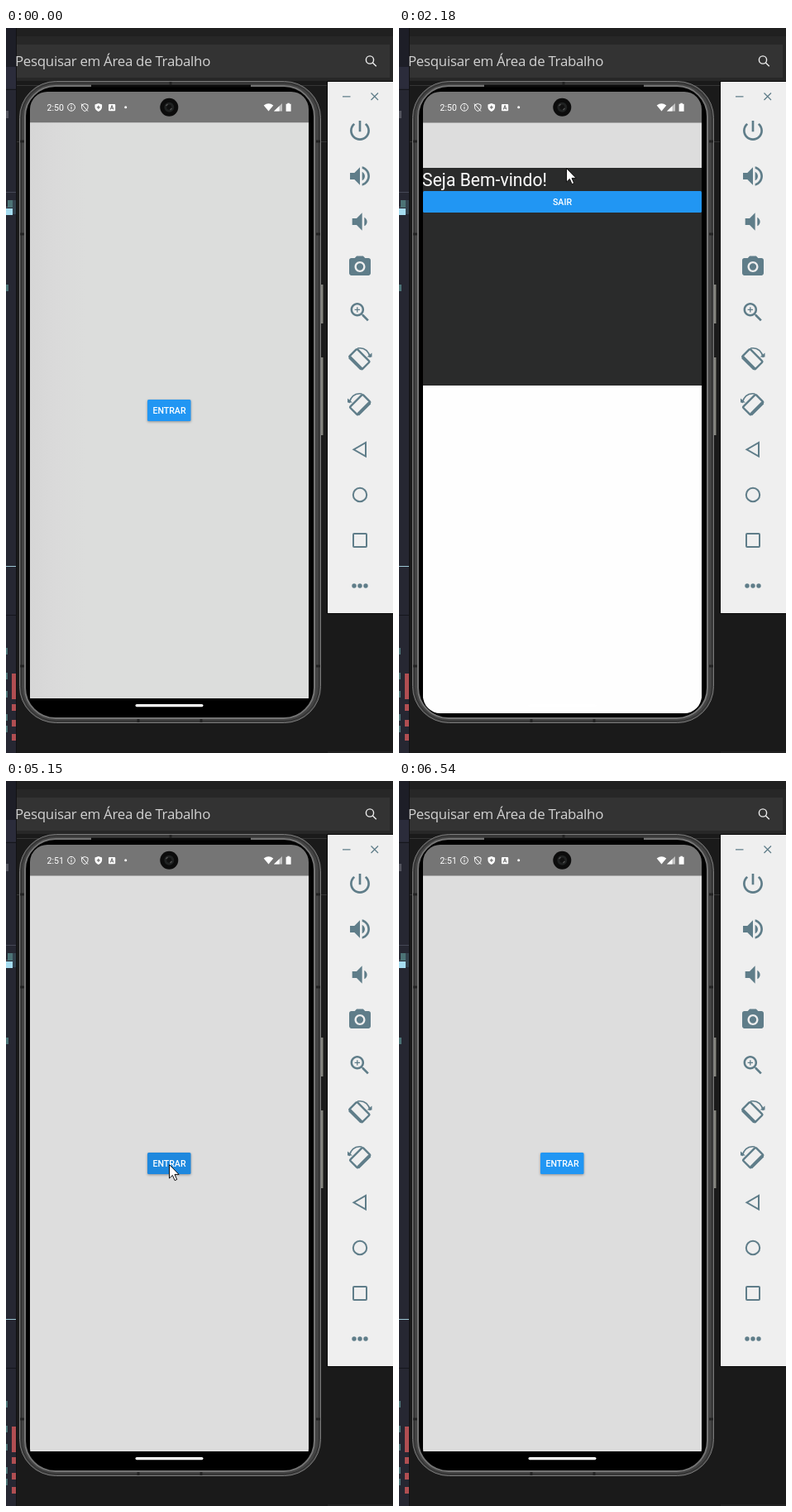
Write an HTML page that moves like this. It is 468 by 876 pixels and loops after 7.07 s.

```html
<!DOCTYPE html>
<html lang="pt">
<head>
<meta charset="utf-8">
<title>Modal</title>
<style>
html, body { margin: 0; width: 100%; height: 100%; overflow: hidden; background: #1a1a1a; }
svg { display: block; width: 468px; height: 876px; }
text { font-family: Roboto, sans-serif; fill: #fff; }
.search { font: 16.9px "Open Sans", sans-serif; letter-spacing: -.3px; fill: #d2d2d2; }
.label { font-size: 10.6px; font-weight: 500; text-anchor: middle; }
.line { fill: none; stroke: #5f7d89; stroke-width: 2; }
.button { filter: drop-shadow(0 1.5px 1.5px rgba(0, 0, 0, .35)); }
</style>
</head>
<body>
<svg viewBox="0 0 468 876">
  <defs>
    <clipPath id="screen"><rect x="29" y="77" width="337" height="751" rx="21"/></clipPath>
    <linearGradient id="tint">
      <stop offset="0" stop-color="#d6d6d6"/><stop offset=".09" stop-color="#dadada"/>
      <stop offset=".2" stop-color="#dcdddc"/>
    </linearGradient>
  </defs>

  <!-- desktop -->
  <rect width="468" height="876" fill="#1a1a1a"/>
  <rect x="12" width="456" height="10" fill="#202020"/>
  <rect x="12" y="10" width="456" height="54" fill="#272727"/>
  <rect x="12" y="20" width="452" height="40" fill="#333"/>
  <path d="M12 69.500H389M12 137.500H389" stroke="#343434"/>
  <path d="M389 875H468" stroke="#222" stroke-width="2"/>

  <!-- editor strip -->
  <rect width="12" height="876" fill="#262732"/>
  <rect width="12" height="47" fill="#1d1e27"/>
  <rect y="47" width="12" height="26" fill="#2b2c3b"/>
  <path d="M0 74.500H12M0 709.500H12" stroke="#15161c"/>
  <path d="M0 198.500H12" stroke="#454856"/>
  <path d="M0 650.500H12" stroke="#9fc9d6"/>
  <path d="M0 100h3v9H0zM0 216h2v1H0z" fill="#54555f"/>
  <path d="M2 208h8v9H2zM0 310h3v8H0zM0 749h2v8H0zM0 779h2v8H0zM0 801h2v8H0zM0 829h2v8H0zM0 843h2v8H0z" fill="#4c7376"/>
  <path d="M0 218h8v8H0z" fill="#a5dcf0"/>
  <path d="M8 208h4v17H8z" fill="#34434e"/>
  <path d="M7 780h5v31H7zM7 817h5v8H7zM7 836h5v8H7zM7 853h5v8H7z" fill="#b04e52"/>
  <path d="M12.500 0V876" stroke="#121214"/>

  <text class="search" x="11" y="46">Pesquisar em Área de Trabalho</text>
  <g fill="none" stroke="#eee" stroke-width="1.4"><circle cx="440" cy="38.500" r="4.600"/><path d="M443.400 42l4.400 4.200"/></g>

  <!-- phone -->
  <path d="M380 310h4v47h-4zM380 398h4v94h-4z" fill="#85857f"/>
  <path d="M383.500 310v47M383.500 398v94" stroke="#4a4a46"/>
  <rect x="16.500" y="64.500" width="364" height="775" rx="44" fill="#444" stroke="#777"/>
  <rect x="18.500" y="66.500" width="360" height="771" rx="42" fill="none" stroke="#2c2c2c"/>
  <rect x="23" y="70" width="350" height="764" rx="37" stroke="#747474" stroke-width="2"/>
  <path d="M103 70H296" stroke="#0b0b0b" stroke-width="3"/>
  <path d="M17 137h5M17 249h5M375 137h5M375 249h5M17 771h5M375 771h5M199 65v4M160 835v4M236 835v4" stroke="#222" stroke-width="3"/>

  <g clip-path="url(#screen)">
    <rect x="29" y="77" width="337" height="38" fill="#757575"/>
    <rect x="29" y="114.500" width="337" height="695.500" fill="#ddd"/>
    <rect id="wash" x="29" y="114.500" width="337" height="695.500" fill="url(#tint)"/>
    <rect id="enter" class="button" x="171" y="449" width="52.500" height="26" rx="1.500" fill="#2196f3"/>
    <text class="label" x="197.500" y="466.200">ENTRAR</text>
    <g id="modal">
      <rect x="29" y="115" width="337" height="263" fill="#2a2b2b"/>
      <rect x="29" y="378" width="337" height="432" fill="#fefefe"/>
      <rect x="29" y="810" width="337" height="20"/>
      <text x="28.100" y="137" font-size="21.150">Seja Bem-vindo!</text>
      <rect x="29" y="143" width="337" height="26" rx="1.500" fill="#2196f3"/>
      <text class="label" x="197.500" y="160.200">SAIR</text>
    </g>
    <rect x="156.500" y="817" width="82" height="3.200" rx="1.600" fill="#fff"/>
  </g>

  <!-- status bar -->
  <text id="clock" x="49.500" y="99.600" font-size="10.600">2:50</text>
  <g fill="none" stroke="#fff">
    <circle cx="79" cy="95.800" r="4.400"/><path d="M79 95v3.200M79 92.900v1.100"/>
    <path d="M95.300 91.500l3.700 1.400v2.800c0 2.300-1.500 3.900-3.700 4.800-2.200-.9-3.700-2.500-3.700-4.800v-2.800zM91 91.500l8 9"/>
  </g>
  <g fill="#fff">
    <path d="M111.800 91l4.300 1.500v3c0 2.500-1.800 4.500-4.300 5.500-2.500-1-4.300-3-4.300-5.500v-3z"/>
    <rect x="124" y="92" width="8.200" height="8.200" rx="1"/>
    <circle cx="144.700" cy="95.800" r="1.500"/>
    <path d="M311.700 93.500q5.800-4.600 11.600 0l-5.800 7z"/>
    <path d="M324 100.500l10-9.500v9.500z" fill-opacity=".55"/><path d="M324 100.500l6.500-6.200v6.200z"/>
    <path d="M340.300 90.800h2.600v1h1.700v9h-6v-9h1.700z"/>
  </g>
  <path d="M109.800 95.800h4M111.800 93.800v4" stroke="#757575" stroke-width="1.300"/>
  <path d="M126.300 98.500l1.800-5 1.800 5M127 97h2.200" fill="none" stroke="#666"/>
  <circle cx="197.300" cy="95.800" r="11" fill="#0c0c0c"/>
  <circle cx="197.300" cy="95.800" r="6" fill="#202222"/>
  <circle cx="197.300" cy="95.800" r="3" fill="#111"/>
  <path d="M193.500 94l2-2M198.500 99l2-2" stroke="#555" stroke-width="1.200"/>

  <!-- emulator toolbar -->
  <rect x="388.500" y="64.500" width="82" height="643" fill="#efefef" stroke="#090909"/>
  <path class="line" style="stroke-width:1.300" d="M407 82.800h9.500M441.500 78.500l8.500 8.500m0-8.500l-8.500 8.500"/>
  <g id="icons" fill="#5f7d89"></g>
  <g id="turn" class="line">
    <g transform="translate(427.500 400) rotate(45)">
      <rect x="-11" y="-6.500" width="22" height="13.500" rx="1.500" stroke-width="2.400"/>
      <path d="M-10 6.800H10" stroke-width="4"/>
    </g>
    <path d="M425 387q12-2 15.500 11" stroke-width="1.700"/>
    <path d="M436.500 397.500h6v-5z" fill="#5f7d89" stroke="none"/>
  </g>
  <use href="#turn" transform="translate(855.500 55) scale(-1 1)"/>
  <path class="line" d="M420.500 509.300l14.500-8.300v16.600z"/>
  <circle class="line" cx="428" cy="564" r="8.200"/>
  <rect class="line" x="420" y="611" width="16" height="16" rx="1"/>
  <path d="M421 674h0M428 674h0M435 674h0" stroke="#5f7d89" stroke-width="5.400" stroke-linecap="round"/>

  <path id="cursor" d="M.5.500v16.500l3.900-3.600 2.700 6.200 2.600-1.100-2.700-6.100h5.100z" fill="#fff" stroke="#111"/>
</svg>
<script>
const $ = id => document.getElementById(id);
const LOOP = 7070, STEP = 69, SLIDE = 400, TRAVEL = 713;

// Material shapes: centre y, scale, path
const icons = [
  [124, 1.33, 'M13 3h-2v10h2V3zm4.83 2.17l-1.42 1.42C17.99 7.86 19 9.81 19 12c0 3.87-3.13 7-7 7s-7-3.13-7-7c0-2.19 1.01-4.14 2.58-5.42L6.17 5.17C4.23 6.82 3 9.26 3 12c0 4.97 4.03 9 9 9s9-4.03 9-9c0-2.74-1.23-5.18-3.17-6.83z'],
  [179, 1.33, 'M3 9v6h4l5 5V4L7 9H3zm13.5 3c0-1.77-1.02-3.29-2.5-4.03v8.05c1.48-.73 2.5-2.25 2.5-4.02zM14 3.23v2.06c2.89.86 5 3.54 5 6.71s-2.11 5.85-5 6.71v2.06c4.01-.91 7-4.49 7-8.77s-2.99-7.86-7-8.77z'],
  [234, 1.33, 'M18.5 12c0-1.77-1.02-3.29-2.5-4.03v8.05c1.48-.73 2.5-2.25 2.5-4.02zM5 9v6h4l5 5V4L9 9H5z'],
  [288.500, 1.3, 'M9 2L7.17 4H4c-1.1 0-2 .9-2 2v12c0 1.1.9 2 2 2h16c1.1 0 2-.9 2-2V6c0-1.1-.9-2-2-2h-3.17L15 2H9zm3 15c-2.76 0-5-2.24-5-5s2.24-5 5-5 5 2.24 5 5-2.24 5-5 5zm0-8.2a3.2 3.2 0 1 0 0 6.400a3.200 3.200 0 1 0 0-6.400z'],
  [343.500, 1.27, 'M15.5 14h-.79l-.28-.27C15.41 12.59 16 11.11 16 9.5 16 5.91 13.09 3 9.5 3S3 5.91 3 9.5 5.91 16 9.5 16c1.61 0 3.09-.59 4.23-1.57l.27.28v.79l5 4.99L20.49 19l-4.99-5zm-6 0C7.01 14 5 11.99 5 9.5S7.01 5 9.5 5 14 7.01 14 9.5 11.99 14 9.5 14zm2.5-4h-2v2H9v-2H7V9h2V7h1v2h2v1z']
];
$('icons').innerHTML = icons.map(([y, s, d]) =>
  `<path fill-rule="evenodd" transform="translate(428 ${y}) scale(${s}) translate(-12 -12)" d="${d}"/>`).join('');

// pointer: time, x, y
const path = [
  [70, 420, 858], [300, 330, 700], [500, 240, 520], [690, 205, 478], [880, 205, 478],
  [1570, 198, 466], [1790, 198, 466], [1984, 202, 482], [2120, 200, 250], [2320, 205, 22],
  [2400, 215, 55], [2540, 231, 110], [2680, 215, 186], [2820, 150, 180], [2950, 114, 142],
  [3080, 180, 155], [3340, 180, 155], [3540, 190, 240], [3892, 283, 629], [4100, 350, 826],
  [4300, 290, 600], [4460, 215, 434], [4600, 197, 463], [5200, 197, 463], [5495, 189, 158],
  [6116, 203, 150], [6200, 225, 190], [6461, 386, 420]
];
const starts = [0, 70, 880, 3340, 4810, 5150];
const clamp = v => Math.min(1, Math.max(0, v));
const slide = (t, from) => (1 - Math.cos(Math.PI * clamp((t - from) / SLIDE))) / 2;

function snap(t) {
  const s = starts.filter(v => v <= t).pop();
  return s + Math.floor((t - s + 10) / STEP) * STEP;
}

function pointer(t) {
  const i = path.findIndex(p => p[0] > t);
  if (i < 0) return path[path.length - 1].slice(1);
  const a = path[Math.max(0, i - 1)], b = path[i];
  const k = clamp((t - a[0]) / (b[0] - a[0] || 1));
  return [1, 2].map(n => Math.round(a[n] + (b[n] - a[n]) * k));
}

function draw(time) {
  const t = snap(time % LOOP);
  const open = slide(t, 1862) - slide(t, 3390) + slide(t, 5163) - slide(t, 6125);
  $('modal').setAttribute('transform', `translate(0 ${Math.floor((1 - open) * TRAVEL)})`);
  $('modal').style.visibility = open > .001 ? 'visible' : 'hidden';
  const [x, y] = pointer(t);
  $('cursor').setAttribute('transform', `translate(${x} ${y})`);
  $('cursor').style.visibility = t >= 70 && t < 6500 ? 'visible' : 'hidden';
  const pressed = (t > 1780 && t < 2200) || (t > 5100 && t < 5500);
  $('enter').setAttribute('fill', pressed ? '#1e88de' : '#2196f3');
  $('wash').style.opacity = 1 - clamp((t - 100) / 500);
  $('clock').textContent = t < 4810 ? '2:50' : '2:51';
}

const origin = performance.now();
function tick() {
  draw(performance.now() - origin);
  requestAnimationFrame(tick);
}
tick();
</script>
</body>
</html>
```
